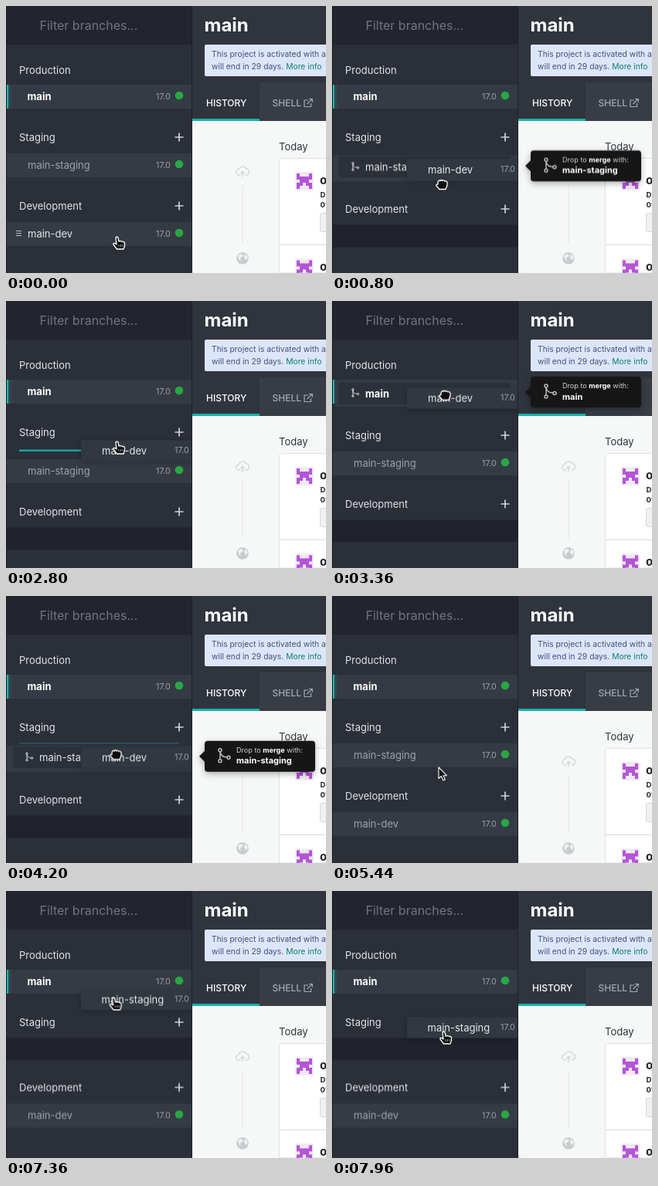
An HTML page for the animation above (8 s loop, 414x346 px).

```html
<!DOCTYPE html>
<html lang="en">
<head>
<meta charset="utf-8">
<title>Branch drag and drop</title>
<style>
html, body { margin: 0; width: 100%; height: 100%; overflow: hidden; background: #2b2e38; }
svg { display: block; width: 414px; height: 346px; font-family: Inter, "Open Sans", sans-serif; }
text { white-space: pre; }
.bold { font-weight: 700; }
.title { font-size: 13px; fill: #e2e4e7; }
.name { font-size: 13px; fill: #9da2a8; }
.lit { fill: #e6e8ea; }
.ver { font-size: 10.8px; fill: #9ca1a8; }
.note { font-size: 10.3px; fill: #41517c; }
.tab { font-size: 12px; font-weight: 500; }
.row { fill: #353b44; }
.slot { fill: #20232b; }
.line { fill: #1aa59d; }
.nest { fill: #2c3039; }

/* Positions: linear between poses. Percent = ms / 80. */
.move { animation: 8s linear infinite; }
.stg { animation-name: stg; }
.stg-row { animation-name: stg-row; }
.dev { animation-name: dev; }
.drag-dev { animation-name: drag-dev; }
.drag-stg { animation-name: drag-stg; }
.cursor { animation-name: cursor; }

@keyframes stg {
  0%, 38.5%, 51%, 81.5%, 89.2%, 100% { transform: translateY(0); }
  39.5%, 50%, 82.3%, 88.3% { transform: translateY(4px); }
}
@keyframes stg-row {
  0%, 8% { transform: translateY(0); }
  9%, 23% { transform: translateY(2.5px); }
  24.5%, 35.75% { transform: translateY(14px); }
  37.5%, 50.75% { transform: translateY(0); }
  51.5% { transform: translateY(4px); }
  52.5%, 53.75% { transform: translateY(3px); }
  54.5%, 100% { transform: translateY(0); }
}
@keyframes dev {
  0%, 3.75% { transform: translateY(0); }
  5%, 7% { transform: translateY(14px); }
  8.5%, 23% { transform: translateY(4px); }
  24.5%, 35.75% { transform: translateY(14px); }
  37.5%, 38.5% { transform: translateY(0); }
  39.5%, 50% { transform: translateY(4px); }
  51% { transform: translateY(6px); }
  52.5%, 53.75% { transform: translateY(5px); }
  54.75%, 74.5% { transform: translateY(0); }
  75.5%, 81.5% { transform: translateY(-4.5px); }
  82.3%, 88.3% { transform: translateY(-.5px); }
  89.2%, 100% { transform: translateY(-4.5px); }
}
@keyframes drag-dev {
  0%, 1% { transform: translateY(295px); }
  8% { transform: translateY(215px); }
  9.5%, 22% { transform: translateY(212px); }
  24.75% { transform: translateY(178px); }
  29.5%, 35% { transform: translateY(194px); }
  42.5%, 50% { transform: translateY(121px); }
  52.5% { transform: translateY(209px); }
  56%, 100% { transform: translateY(295px); }
}
@keyframes drag-stg {
  0%, 74.5% { transform: translateY(206px); }
  80% { transform: translateY(144.5px); }
  83%, 87% { transform: translateY(121px); }
  97% { transform: translateY(160px); }
  99.5%, 100% { transform: translateY(177px); }
}
@keyframes cursor {
  0%, 1% { transform: translate(146px, 307px); }
  10% { transform: translate(142px, 231px); }
  13.5%, 22% { transform: translate(142px, 227px); }
  24.75% { transform: translate(145px, 176px); }
  29.5%, 35% { transform: translate(146px, 190px); }
  42.5%, 50% { transform: translate(146px, 117px); }
  52.5% { transform: translate(142px, 205px); }
  56% { transform: translate(144px, 300px); }
  59.5%, 62.5% { transform: translate(146px, 303px); }
  68% { transform: translate(142px, 230px); }
  70.5%, 74% { transform: translate(140px, 210px); }
  80% { transform: translate(140px, 150px); }
  83%, 87% { transform: translate(140px, 124px); }
  97% { transform: translate(143px, 168px); }
  99.5%, 100% { transform: translate(147px, 190px); }
}

/* Hard switches between states. */
.show { animation: 8s step-end infinite; }
.dev-held { animation-name: dev-held; }
.dev-hover { animation-name: dev-hover; }
.dev-rest { animation-name: dev-rest; }
.stg-held { animation-name: stg-held; }
.stg-hover { animation-name: stg-hover; }
.stg-rest { animation-name: stg-rest; }
.on-stg { animation-name: on-stg; }
.on-main { animation-name: on-main; }
.off-main { animation-name: off-main; }
.line-low { animation-name: line-low; }
.line-top { animation-name: line-top; }
.line-thin { animation-name: line-thin; }
.hand { animation-name: hand; }
.fist { animation-name: fist; }
.arrow { animation-name: arrow; }

@keyframes dev-held { 0%, 56.5% { opacity: 0; } 1% { opacity: 1; } }
@keyframes dev-hover { 0%, 56.5% { opacity: 1; } 1%, 64% { opacity: 0; } }
@keyframes dev-rest { 0% { opacity: 0; } 64% { opacity: 1; } }
@keyframes stg-held { 0% { opacity: 0; } 74.5%, 100% { opacity: 1; } }
@keyframes stg-hover { 0%, 74.5% { opacity: 0; } 69% { opacity: 1; } }
@keyframes stg-rest { 0%, 23.25%, 53.75% { opacity: 1; } 8%, 51.625%, 69% { opacity: 0; } }
@keyframes on-stg { 0%, 23.25%, 53.75% { opacity: 0; } 8%, 51.625% { opacity: 1; } }
@keyframes on-main { 0%, 50.5%, 88.75% { opacity: 0; } 38.5%, 81.5% { opacity: 1; } }
@keyframes off-main { 0%, 50.5%, 88.75% { opacity: 1; } 38.5%, 81.5% { opacity: 0; } }
@keyframes line-low { 0%, 8% { opacity: 0; } 4% { opacity: 1; } }
@keyframes line-top { 0%, 37% { opacity: 0; } 23.25% { opacity: 1; } }
@keyframes line-thin { 0%, 53.25% { opacity: 0; } 50.75% { opacity: .6; } }
@keyframes hand {
  0%, 23.25%, 50.5%, 53.75%, 69%, 88.75% { opacity: 1; }
  8%, 38.5%, 51.625%, 64%, 81.5% { opacity: 0; }
}
@keyframes fist {
  0%, 23.25%, 50.5%, 53.75%, 88.75% { opacity: 0; }
  8%, 38.5%, 51.625%, 81.5% { opacity: 1; }
}
@keyframes arrow { 0%, 69% { opacity: 0; } 64% { opacity: 1; } }
</style>
</head>
<body>
<svg viewBox="0 0 414 346">
  <defs>
    <linearGradient id="glow">
      <stop stop-color="#27605f"/>
      <stop offset="1" stop-color="#353b44"/>
    </linearGradient>
    <filter id="shade" x="-10%" y="-40%" width="120%" height="200%">
      <feDropShadow dx="0" dy="2" stdDeviation="3" flood-opacity=".22"/>
    </filter>
    <filter id="lift" x="-15%" y="-40%" width="130%" height="200%">
      <feDropShadow dx="0" dy="3" stdDeviation="4" flood-opacity=".3"/>
    </filter>
    <path id="plus" d="M218.500 0h11M224-5.500v11" stroke="#d0d3d6" stroke-width="1.700"/>
    <g id="status">
      <text class="ver" x="194" y="4">17.0</text>
      <circle cx="224" cy="-1" r="5.300" fill="#28a745"/>
    </g>
    <path id="grip" d="M13-3.500h7M13-.5h7M13 2.500h7" stroke="#c3c7cb"/>
    <g id="branch" fill="none" stroke-width="1.500">
      <path d="M-5-5V5M-5-5C-4 1 0 2 4 2"/>
      <circle cx="-5" cy="-7" r="2"/>
      <circle cx="-5" cy="7" r="2"/>
      <circle cx="6" cy="2.500" r="2"/>
    </g>
    <g id="nested">
      <rect class="nest" x="9" y="-14" width="222" height="28"/>
      <use href="#branch" stroke="#f0f1f2" transform="translate(30 -.5) scale(.6)"/>
    </g>
    <g id="ghost">
      <rect x="97" y="-13.500" width="150" height="27" fill="#31373f" filter="url(#shade)"/>
      <text class="ver" x="218" y="3">17.0</text>
    </g>
    <g id="tip">
      <path d="M250 0l7-7V-16a4 4 0 0 1 4-4H396a4 4 0 0 1 4 4V16a4 4 0 0 1-4 4H261a4 4 0 0 1-4-4V7z" fill="#141517" filter="url(#lift)"/>
      <use href="#branch" x="282" y="-1" stroke="#bdbdbe"/>
      <text x="298" y="-5" font-size="9.1" fill="#cfcfd0">Drop to <tspan class="bold" fill="#fff">merge</tspan> with:</text>
    </g>
    <g id="avatar">
      <rect x="-1" y="-1" width="24" height="24" rx="1" fill="#f0e9f4"/>
      <path transform="translate(1 1)" d="M0 2h4M16 2h4M0 6h20M4 10h12M0 14h8M12 14h8M0 18h4M16 18h4" stroke="#b455d6" stroke-width="4.050"/>
    </g>
  </defs>

  <!-- Sidebar -->
  <rect width="241" height="346" fill="#2b2f38"/>
  <rect width="241" height="50" fill="#22252d"/>
  <text x="43.500" y="31" font-size="16" fill="#70757d">Filter branches...</text>

  <g class="move dev">
    <text class="title" x="17" y="264">Development</text>
    <use href="#plus" y="259"/>
    <rect class="row" x="1" y="280" width="239" height="31"/>
    <g transform="translate(0 295)">
      <g class="show dev-hover">
        <use href="#grip"/>
        <text class="name lit" x="28" y="5">main-dev</text>
      </g>
      <text class="name show dev-rest" x="28" y="5">main-dev</text>
      <use href="#status"/>
    </g>
    <g class="show dev-held">
      <rect y="279" width="241" height="34" fill="#2b2f38"/>
      <rect class="slot" y="279.500" width="241" height="29"/>
    </g>
  </g>

  <g class="move stg">
    <text class="title" x="17" y="175">Staging</text>
    <use href="#plus" y="170"/>
    <rect class="line show line-top" x="17" y="192.500" width="207" height="2.500"/>
    <rect class="line show line-low" x="17" y="226" width="207" height="2.500"/>
    <rect class="line show line-thin" x="17" y="190.500" width="207" height="1"/>
    <g class="move stg-row">
      <rect class="row" x="1" y="191" width="239" height="31"/>
      <g transform="translate(0 206)">
        <text class="name show stg-rest" x="28" y="5">main-staging</text>
        <g class="show stg-hover">
          <use href="#grip"/>
          <text class="name lit" x="28" y="5">main-staging</text>
        </g>
        <use href="#status"/>
        <g class="show on-stg">
          <rect class="row" x="1" y="-14" width="239" height="33"/>
          <use href="#nested"/>
          <text class="name lit" x="43" y="5">main-staging</text>
        </g>
      </g>
    </g>
    <g class="show stg-held">
      <rect y="190" width="241" height="33" fill="#2b2f38"/>
      <rect class="slot" y="190" width="241" height="29"/>
    </g>
  </g>

  <text class="title" x="17" y="88">Production</text>
  <rect class="row" x="1" y="102" width="239" height="31"/>
  <rect x="1" y="102" width="7" height="31" fill="url(#glow)"/>
  <rect x="1" y="102" width="2" height="31" fill="#1fb5ac"/>
  <g transform="translate(0 117)">
    <text class="name bold show off-main" x="27.500" y="5" style="fill:#fff">main</text>
    <use href="#status"/>
    <g class="show on-main">
      <rect class="row" x="4" y="-15" width="236" height="35"/>
      <use href="#nested" y="2.500"/>
      <text class="name bold" x="43" y="7.500" style="fill:#fff">main</text>
    </g>
  </g>

  <g class="show dev-held">
    <g class="move drag-dev">
      <use href="#ghost"/>
      <text class="name lit" x="124" y="5">main-dev</text>
    </g>
  </g>
  <g class="show stg-held">
    <g class="move drag-stg">
      <use href="#ghost"/>
      <text class="name lit" x="123.500" y="5">main-staging</text>
    </g>
  </g>
  <path d="M.5 0v346M240.500 0v346" stroke="#1d2027"/>

  <!-- Project header -->
  <rect x="241" width="173" height="149" fill="#30343d"/>
  <text class="bold" x="256.500" y="33" font-size="24" fill="#fff">main</text>
  <rect x="257" y="50" width="165" height="41" rx="2" fill="#dde6f8"/>
  <text class="note" x="266" y="66">This project is activated with a</text>
  <text class="note" x="266" y="82">will end in 29 days. <tspan fill="#0b7f7c">More info</tspan></text>
  <rect x="328" y="99" width="86" height="50" fill="#383c45"/>
  <rect x="241" y="146" width="87" height="3" fill="#14b3aa"/>
  <text class="tab" x="259" y="130" fill="#fff">HISTORY</text>
  <text class="tab" x="344.500" y="130" fill="#a5a9af">SHELL</text>
  <path d="M391 122h-5v8.500h8.500v-4.500M389.500 127l6.500-6.500M392 120.500h4.300v4.300" fill="none" stroke="#a5a9af" stroke-width="1.200"/>

  <!-- History -->
  <rect x="241" y="149" width="173" height="197" fill="#f6f7f7"/>
  <text x="353" y="187" font-size="13" fill="#30343b">Today</text>
  <path d="M306 233v75" stroke="#e3e5e6"/>
  <g fill="none" stroke="#d3d5d8" stroke-width="1.500" transform="translate(306 215) scale(.9) translate(-306 -215.500)">
    <path d="M303 220h-2a4 4 0 0 1-.5-8a6 6 0 0 1 11-1a4.600 4.600 0 0 1 .5 9h-2"/>
    <path d="M306 223v-8M303 218l3-3l3 3"/>
  </g>
  <circle cx="306" cy="327" r="7.800" fill="#c8cbce"/>
  <path d="M300 323l5-2l2 3l-4 3l1 4l-3-3zM309 321l4 4l-2 5l-3-4z" fill="#eff0f1"/>
  <path d="M420 197.500H357a3.500 3.500 0 0 0-3.500 3.500V346H420z" fill="#fff" stroke="#dfe1e3"/>
  <path d="M353 309.500h61" stroke="#dadcdf"/>
  <use href="#avatar" x="375" y="216"/>
  <use href="#avatar" x="375" y="328.500"/>
  <g class="bold" fill="#22252b">
    <text x="406" y="231" font-size="15">o</text>
    <text x="406" y="343" font-size="15">o</text>
    <text x="406.500" y="248" font-size="9.500">D</text>
    <text x="406.500" y="261" font-size="9.500">01</text>
  </g>
  <rect x="406.500" y="268.500" width="20" height="24" rx="2" fill="#f0f1f2" stroke="#d3d5d8"/>

  <!-- Drop hints -->
  <g class="show on-stg">
    <g class="move stg-row">
      <g transform="translate(0 204.800)">
        <use href="#tip"/>
        <text class="bold" x="298" y="9.500" font-size="11" fill="#fff">main-staging</text>
      </g>
    </g>
  </g>
  <g class="show on-main">
    <g transform="translate(0 118)">
      <use href="#tip"/>
      <text class="bold" x="298" y="9.500" font-size="11" fill="#fff">main</text>
    </g>
  </g>

  <g class="move cursor" fill="#0c0d0f" stroke="#fff" stroke-linejoin="round">
    <g class="show hand" stroke-width="1.300">
      <path d="M-4-7q1.500-1.500 3 0l1 5q1.500-1 2.500 0q1.500-.6 2.500.6q2-.4 2.500 1.400v4l-1.500 4H-2.500L-7 2q-.5-2 2-1.500l2 1.500z"/>
      <path d="M0 2v3M2.500 2v3M5 2v3" stroke-width=".6"/>
    </g>
    <path class="show fist" stroke-width="1.300" d="M-5-3q1.500-3 3-1.500q1.500-2 3 0q1.500-1.500 3 .5q2.500-.5 3 1.500v4l-2 5h-8L-7 2q-.5-2.500 2-2z"/>
    <path class="show arrow" d="M-4-8V6.500l3.400-3L1.800 9l2.500-1L2 2.700h4.400z" stroke-width="1.100"/>
  </g>
</svg>
</body>
</html>
```
